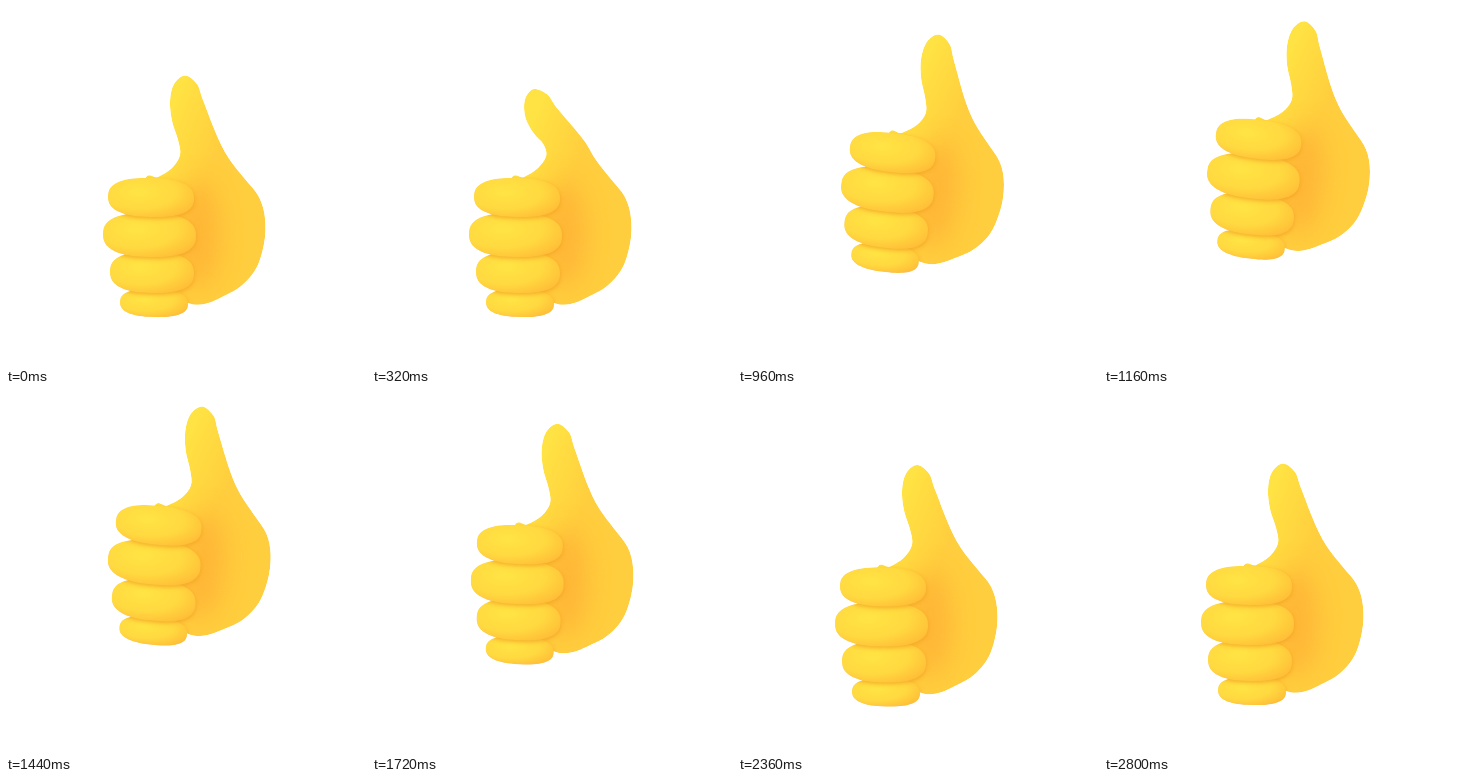
An HTML page for the animation above (2920 ms loop, 360x360 px).

```html
<!DOCTYPE html>
<html lang="en">
<head>
<meta charset="utf-8">
<title>Thumbs up</title>
<style>
  html, body { margin: 0; width: 100%; height: 100%; overflow: hidden; background: #fff; }
  svg { display: block; width: 100vw; height: 100vh; }
</style>
</head>
<body>
<svg viewBox="0 0 360 360">
  <defs>
    <path id="palm"/>
    <radialGradient id="skin" cx=".36" cy=".36" r=".72">
      <stop offset="0" stop-color="#ffe444"/>
      <stop offset=".6" stop-color="#ffd940"/>
      <stop offset="1" stop-color="#ffc038"/>
    </radialGradient>
    <linearGradient id="palmSkin" gradientUnits="userSpaceOnUse" x1="162" y1="115" x2="215" y2="135">
      <stop offset="0" stop-color="#ffe243"/>
      <stop offset=".5" stop-color="#ffd840"/>
      <stop offset="1" stop-color="#ffce3e"/>
    </linearGradient>
    <filter id="soft" x="-80%" y="-50%" width="260%" height="200%"><feGaussianBlur stdDeviation="13"/></filter>
    <filter id="contact" x="-20%" y="-40%" width="140%" height="180%"><feGaussianBlur stdDeviation="2.2"/></filter>
    <clipPath id="outline"><use href="#palm"/></clipPath>
  </defs>
  <g id="hand">
    <g id="layers" clip-path="url(#outline)">
      <use href="#palm" fill="url(#palmSkin)"/>
      <ellipse cx="192" cy="228" rx="22" ry="54" fill="#ffb036" opacity=".8" filter="url(#soft)"/>
    </g>
  </g>
</svg>
<script>
const LOOP = 2920, STEP = 40, LAST = 2800;

// Key points of the palm and the upright thumb.
const outline = [
  [138, 176], [152, 171], [166, 162], [174, 149], [172, 134], [166, 115], [164, 95], [168, 78],
  [179, 69.5], [191, 78], [197, 94], [212, 132], [224, 154], [239, 173], [253, 191], [259, 212],
  [258, 238], [248, 266], [224, 287], [182, 297], [130, 250]
];

// Fingers from the bottom up: centre and radii.
const fingers = [[148, 297, 34, 14], [146, 266.5, 42, 20.5], [143.5, 229, 46.5, 22], [145, 191.5, 43, 19.5]];

const $ = id => document.getElementById(id);
const clamp = u => Math.min(1, Math.max(0, u));
const span = (t, from, to) => clamp((t - from) / (to - from));
const smooth = u => u * u * u * (10 - 15 * u + 6 * u * u);
const easeOut = u => 1 - (1 - u) ** 3;

// Blunt ellipse, slightly lower on its right side.
function fingerPath([cx, cy, rx, ry]) {
  const blunt = v => Math.sign(v) * Math.abs(v) ** .8;
  const points = Array.from({ length: 72 }, (_, i) => {
    const a = i / 36 * Math.PI, c = Math.cos(a);
    return [cx + rx * blunt(c), cy + ry * blunt(Math.sin(a)) + c];
  });
  return `M${points.join('L')}Z`;
}

// Closed smooth curve through the points.
function curvePath(points) {
  const n = points.length, at = i => points[(i + n) % n];
  const handle = (i, side) => at(i).map((v, k) => v + side * (at(i + 1)[k] - at(i - 1)[k]) / 6);
  return `M${points[0]}` + points.map((_, i) =>
    `C${handle(i, 1)} ${handle(i + 1, -1)} ${at(i + 1)}`).join('') + 'Z';
}

// Turns a point around the thumb's base, more so near the tip.
function bendPoint([x, y], bend) {
  const a = bend * .383 * smooth(span(y, 165, 90));
  const dx = x - 220, dy = y - 142, c = Math.cos(a), s = Math.sin(a);
  return [220 + dx * c + dy * s, 142 - dx * s + dy * c];
}

function add(parent, name, attrs) {
  const el = document.createElementNS('http://www.w3.org/2000/svg', name);
  for (const key in attrs) el.setAttribute(key, attrs[key]);
  parent.append(el);
}

for (const finger of fingers) {
  const d = fingerPath(finger);
  add($('outline'), 'path', { d });
  add($('layers'), 'path', { d, transform: 'translate(0 1.5)', fill: '#f09c22', opacity: .75, filter: 'url(#contact)' });
  add($('layers'), 'path', { d, fill: 'url(#skin)' });
}

function draw(t) {
  const bend = smooth(span(t, 0, 520)) - smooth(span(t, 680, 900));
  const lift = -60.5 * easeOut(span(t, 725, 1360))
    + 74 * smooth(span(t, 1360, 2060) ** 1.5)
    - 13.5 * smooth(span(t, 2060, 2460));
  const tilt = 5.7 * (easeOut(span(t, 725, 960)) - smooth(span(t, 1120, 2100)));
  $('palm').setAttribute('d', curvePath(outline.map(p => bendPoint(p, bend))));
  $('hand').setAttribute('transform', `translate(0 ${lift}) rotate(${tilt} 145 288)`);
}

const start = performance.now();
function tick() {
  const t = (performance.now() - start) % LOOP;
  draw(Math.min(Math.floor(t / STEP) * STEP, LAST));
  requestAnimationFrame(tick);
}
tick();
</script>
</body>
</html>
```
